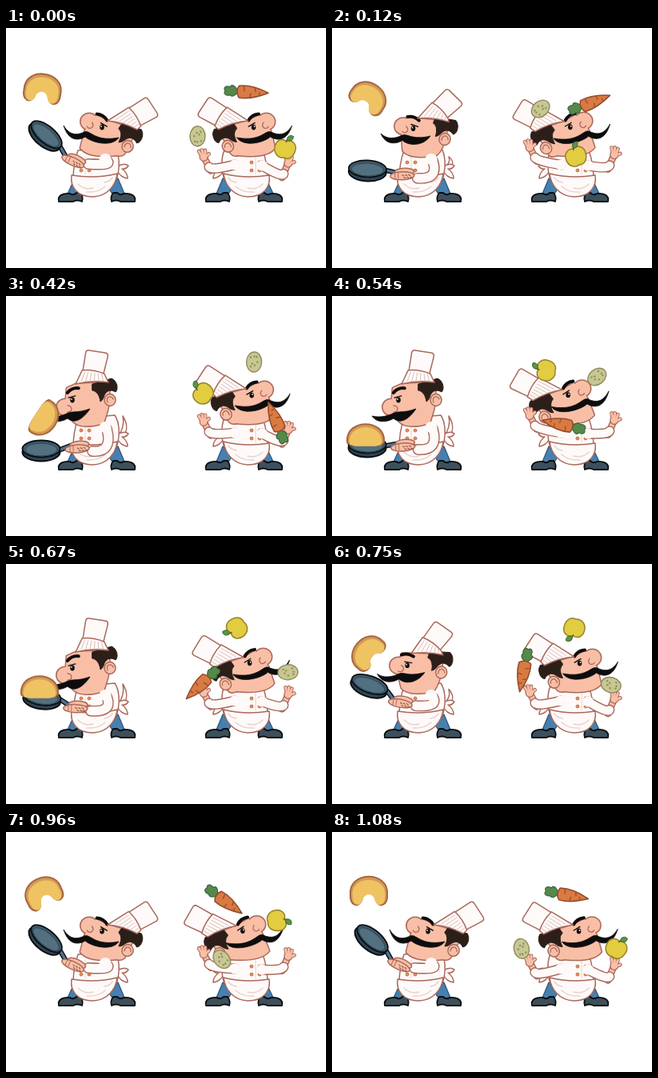
Recreate the animation shown at these times as an HTML page with a canvas. Size 400 px wide and 300 px high, loop 1120 ms.

```html
<!DOCTYPE html>
<html lang="en">
<head>
<meta charset="utf-8">
<title>Two cooks</title>
<style>
html, body { margin: 0; width: 100%; height: 100%; overflow: hidden; background: #fff; }
canvas { display: block; width: 400px; height: 300px; }
</style>
</head>
<body>
<canvas id="stage" width="400" height="300"></canvas>
<script>
const ctx = document.getElementById('stage').getContext('2d');
const LOOP = 1120, STEPS = 27, BEAT = 9, TURN = 2 * Math.PI;
const LINE = '#a9695c', SKIN = '#f9bfa6', WHITE = '#fefaf9', FOLD = '#e8d3ce',
  INK = '#0e0d0e', HAIR = '#2c1f1a', BLUE = '#4580b0', SHOE = '#3c505c';
ctx.lineCap = ctx.lineJoin = 'round';

// Motion helpers
const ease = (a, b, k) => {
  const t = Math.min(1, Math.max(0, (k - a) / (b - a)));
  return t * t * (3 - 2 * t);
};
const mix = (a, b, t) => a + (b - a) * t;
const between = (a, b, t) => [mix(a[0], b[0], t), mix(a[1], b[1], t)];
const swing = (q, peak) => Math.cos(TURN * (q - peak) / BEAT);

// Drawing helpers
function shape(d, fill, line, width = 1.5) {
  const p = typeof d === 'string' ? new Path2D(d) : d;
  if (fill) { ctx.fillStyle = fill; ctx.fill(p); }
  if (line) { ctx.strokeStyle = line; ctx.lineWidth = width; ctx.stroke(p); }
}
function oval(x, y, rx, ry, fill, line, width) {
  const p = new Path2D();
  p.ellipse(x, y, rx, ry, 0, 0, TURN);
  shape(p, fill, line, width);
}
function tube(d, width, fill, line, edge = 1.4) {
  shape(d, null, line, width + 2 * edge);
  shape(d, null, fill, width);
}
function at(x, y, deg, draw, sx = 1, sy = sx) {
  ctx.save();
  ctx.translate(x, y);
  ctx.scale(sx, sy);
  ctx.rotate(deg * Math.PI / 180);
  draw();
  ctx.restore();
}

// Parts shared by both cooks, drawn facing left
function body(ribbon) {
  shape('M85,190 L95,200 L90,209 L77,207Z', BLUE, '#2d5275', 1.2);
  shape('M128,200 L140,188 L148,207 L134,209Z', BLUE, '#2d5275', 1.2);
  const shoe = 'M0,11 C-2,3 6,0 14,1 Q18,4 22,0 L27,0 Q31,5 29,11 Q23,8 18,11Z';
  at(66, 206, 0, () => shape(shoe, SHOE, INK, 1.8));
  at(161, 206, 0, () => shape(shoe, SHOE, INK, 1.8), -1, 1);
  at(143, 175, 0, () => shape('M-4,2 C3,-7 5,-16 3,-25 C10,-14 9,-6 3,2Z', WHITE, LINE), 1, ribbon);
  shape('M139,173 Q148,168 153,172 Q150,177 145,176 Q152,181 152,188 Q143,187 139,178Z', WHITE, LINE);
  shape('M90,153 C86,164 84,178 84,190 L138,190 C143,174 142,158 136,149Z', WHITE, LINE);
  for (const x of [94, 104]) for (const y of [168, 178])
    oval(x, y, 2, 2, '#ee8d4b', '#b86540', .8);
  shape('M99,160 L99,183', null, FOLD, 1);
  shape('M82,184 C80,198 88,211 109,211 C127,210 137,197 139,182 C120,187 100,187 82,184Z', WHITE, LINE);
  shape('M90,195 Q98,203 109,200 M101,205 Q115,206 124,198 M123,193 Q130,192 133,187', null, FOLD, 1.5);
}

// Head: lean 0 looks ahead, 1 looks up with the hat tipped back
function head(u) {
  const v = 1.55 * u / (u + .55);
  const nose = [74 + 30 * u, 139 - 22 * v], eye = [83 + 37 * u, 130 - 6 * v];
  const lip = [76 + 22 * u, 147 - 17 * v], ear = [130 + 22 * u, 130 + 18 * u];
  const front = [87 + 40 * u, 110 + 6 * u], back = [128 + 36 * u, 108 + 19 * u];
  const crown = [109 + 52 * u, 95 + 16 * u], chin = [84 + 9 * u, 157 - 7 * u];

  const face = new Path2D(`M${chin} L${lip} L${nose} L${eye[0] - 7},${eye[1] - 15} L${front} L${back}
    L${ear} Q${ear[0] - 3},${ear[1] + 14} ${122 + 17 * u},159 Q${94 + 9 * u},${167 - 4 * u} ${chin}Z`);
  face.moveTo(nose[0] + 10, nose[1]);
  face.ellipse(...nose, 10.5, 10, 0, 0, TURN);
  shape(face, null, LINE, 3);
  shape(face, SKIN);
  at(...nose, 50 * v, () => shape('M3,-2 C10,-2 9,7 3,6', null, LINE, 1.3));
  oval(...eye, 2.8, 3.4, INK);
  oval(eye[0] - 1, eye[1] - 1, .8, 1, '#fff');
  at(...eye, 45 * v - 15, () => shape('M-4,-4 L5,-4', null, INK, 1.4));
  at(eye[0] + 1, eye[1] - 13, 55 * v - 15, () => shape('M-8,2 Q-1,-3 7,0', null, INK, 4));

  at(...ear, 35 * v, () => {
    shape('M-22,-20 L2,-27 C9,-24 11,-14 7,-10 C2,-13 -3,-12 -5,-9 C-8,-7 -7,-1 -12,2 C-13,-5 -16,-11 -22,-12Z', HAIR, HAIR, 1);
    oval(0, 0, 7, 7.5, SKIN, LINE);
    shape('M-3,3 C-6,-5 2,-6 4,-1', null, LINE, 1.3);
  });

  const tilt = 9 + 48 * v, rad = tilt * Math.PI / 180;
  const dx = 14 * Math.cos(rad), dy = 14 * Math.sin(rad);
  const left = [crown[0] - dx, crown[1] - dy], right = [crown[0] + dx, crown[1] + dy];
  at(...crown, tilt, () => shape('M-13,1 L-13,-22 Q-13,-26 -9,-26 L11,-26 Q15,-26 15,-22 L13,1Z', WHITE, LINE));
  const mid = between(front, back, .5);
  shape(`M${front} L${left} Q${crown[0] + dy * .25},${crown[1] - dx * .25} ${right} L${back} Q${mid[0] + 1},${mid[1] - 4} ${front}Z`, WHITE, LINE);
  for (let i = 1; i < 7; i++) {
    const a = between(front, back, i / 7), b = between(left, right, i / 7);
    shape(`M${between(a, b, .2)} L${between(a, b, .9)}`, null, '#dcbdb6', 1);
  }

  const end = 29 + 14 * u, drop = 13 * u - 6, tip = 3 - 11 * u;
  at(...lip, 0, () => shape(`M0,0 C7,-4 12,${drop + 6} ${end},${drop} C${end - 8},${drop + 12} 10,14 1,6
    C-7,11 -20,12 -26,${tip} C-18,5 -9,4 0,0Z`, INK, INK, .8));
}

// Cook with the pan
function panCook(k) {
  const lean = 1 - ease(0, 6, k) + ease(16, 21.5, k);
  const raise = 1 - ease(0, 4.5, k) + ease(11, 22, k);
  const px = 44 + 6 * raise ** 2, py = 192 - 58 * raise, slant = 40 * raise ** 2;
  const gx = 89 - 5 * raise, gy = 190 - 24 * raise;
  body(mix(1, .15, lean));
  head(lean);

  const rad = slant * Math.PI / 180;
  tube(`M${px + 24 * Math.cos(rad)},${py + 24 * Math.sin(rad)} L${gx - 8},${gy - 3}`, 3.5, '#4d7191', INK);
  at(px, py, slant, drawPan);
  omelette(k, py - 9);

  tube(`M126,166 Q134,${gy + 6} ${gx + 19},${gy + 4}`, 11, WHITE, LINE);
  oval(124, 164, 7.5, 7, WHITE);
  at(gx, gy, 29 * raise ** 2 - 4, () => {
    oval(3, -4, 12, 4.5, SKIN, LINE);
    oval(0, 1, 15, 5, SKIN, LINE);
    shape('M-9,-2 L-9,4 M-5,-3 L-5,4', null, LINE, 1);
    for (let i = 0; i < 6; i++)
      shape(`M${2 * i},${i % 2 * 3} l2,1`, null, '#8d5a45', 1.2);
  });
}
function drawPan() {
  oval(0, 3, 23.5, 11.5, '#2b4556', INK, 2);
  oval(0, -1, 23.5, 10.5, '#3f5a6a', INK, 1.8);
  oval(0, 0, 20, 8, '#52707f', '#2c4759', 1);
}
function omelette(k, rest) {
  const air = (k + 10) % STEPS;           // steps since the toss
  const flying = air < 22;
  const lift = k > 12 ? ease(16, 19, k) : 1;
  const y = flying ? mix(rest, 73 + .55 * (air - 8) ** 2, lift) : rest;
  const spin = flying ? lift * (8.5 * (air - 9) + .6 * Math.max(0, air - 13) ** 2) : 0;
  const b = 1 - ease(0, 9, k) + ease(16, 20, k);
  const d = `M-23,4 C-25,-25 25,-25 23,4 C24,${8 + 12 * b} 12,${9 + 12 * b} 9,${9 + 3 * b}
    C7,${9 - 9 * b} -7,${9 - 9 * b} -9,${9 + 3 * b} C-12,${9 + 12 * b} -24,${8 + 12 * b} -23,4Z`;
  at(mix(42, 46, lift), y, spin, () => {
    shape(d, '#d59a55', '#a3683f', 2);
    at(0, 2, 0, () => shape(d, '#efc362'), .88);
  });
}

// Juggled food
function drawCarrot() {
  shape('M-13,0 C-18,-9 -22,-8 -23,-5 C-29,-7 -32,-3 -29,0 C-32,4 -27,7 -23,5 C-20,8 -16,6 -13,0Z', '#55894a', '#39653a', 1.2);
  shape('M-12,-7 C-15,-3 -15,4 -11,8 C0,9 14,5 25,0 C14,-5 0,-9 -12,-7Z', '#d97a42', '#8f4a2c');
  shape('M-6,-6 l1,5 M2,7 l1,-5 M8,-5 l1,4 M14,3 l0,-3', null, '#9c4f2d', 1.4);
}
function drawPotato() {
  oval(0, 0, 12.5, 9.5, '#c8c793', '#8f8a5c', 1.4);
  for (let i = 0; i < 7; i++)
    oval(7 * Math.cos(i * 2.2), 4.5 * Math.sin(i * 2.9), 1.4, 1.2, '#8d9557');
}
function drawApple() {
  shape('M0,-10 C7,-14 14,-8 13,0 C12,9 6,13 0,11 C-6,13 -13,8 -13,0 C-13,-9 -6,-13 0,-10Z', '#e2cc40', '#97812c');
  shape('M0,-9 L1,-13', null, '#6b5a2a', 1.6);
  shape('M1,-11 C-1,-17 5,-19 8,-17 C8,-12 5,-10 1,-11Z', '#5c9545', '#3f6d38', 1);
}
const foods = [
  { draw: drawCarrot, base: 3, dir: -1, wobble: 25, lag: 0 },
  { draw: drawPotato, base: 120, dir: 1, wobble: 28, lag: TURN / 4 },
  { draw: drawApple, base: 50, dir: -1, wobble: 40, lag: TURN / 4 },
];

// Thrown in an arc for 17 steps, then passed across the chest for 10
function toss(step) {
  const p = (step + 9.5) % STEPS - 9.5;
  if (p < 7.5) return [303 + 7.06 * p, 79 + .88 * (p + 1) ** 2];
  const u = (p - 7.5) / 10;
  return [mix(356, 236, ease(0, 1, u)), 143 + 18 * Math.sin(Math.PI * u)];
}

function arm(sx, sy, x, y, ex, ey, tilt) {
  const cuff = between([ex, ey], [x, y], .25);
  tube(`M${ex},${ey} L${x},${y}`, 6, SKIN, LINE);
  tube(`M${sx},${sy} Q${ex},${ey} ${cuff}`, 10, WHITE, LINE);
  oval(sx, sy, 7, 6.5, WHITE);
  at(x, y, tilt, () => {
    const fingers = 'M-2,0 L-5,-7 M0,0 L-1,-8 M2,0 L3,-7 M2,1 L7,-2';
    tube(fingers, 2.6, SKIN, LINE, 1.1);
    oval(0, 1, 5, 5, SKIN, LINE, 1.2);
    shape(fingers, null, SKIN, 2.6);
  });
}
function juggler(k) {
  const q = (k + 2) % BEAT;               // steps since the last catch
  const backY = 155 + 7 * swing(q, 1), frontY = 161 + 7 * swing(q, 2);
  at(411, 0, 0, () => body(.15), -1, 1);
  arm(320, 172, 353, frontY, 345, frontY + 19, 12);
  at(426 + 4 * swing(q, 1), 0, 0, () => head(1.1 - .12 * swing(q, 2.5)), -1, 1);
  arm(286, 171, 247, backY, 256, backY + 18, -8);
  foods.forEach(({ draw, base, dir, wobble, lag }, i) => {
    const phase = TURN * k / STEPS;
    const spin = base + dir * 360 * k / STEPS + wobble * Math.sin(phase - lag);
    at(...toss(k + STEPS - BEAT * i), spin, draw);
  });
}

// 24 pictures a second, each start rounded to 10 ms
const starts = Array.from({ length: STEPS }, (_, k) => Math.round(k * 25 / 6 - .01) * 10);
const t0 = performance.now();
function render() {
  const t = (performance.now() - t0) % LOOP;
  const k = starts.findLastIndex(s => s <= t);
  ctx.clearRect(0, 0, 400, 300);
  panCook(k);
  juggler(k);
  requestAnimationFrame(render);
}
render();
</script>
</body>
</html>
```
